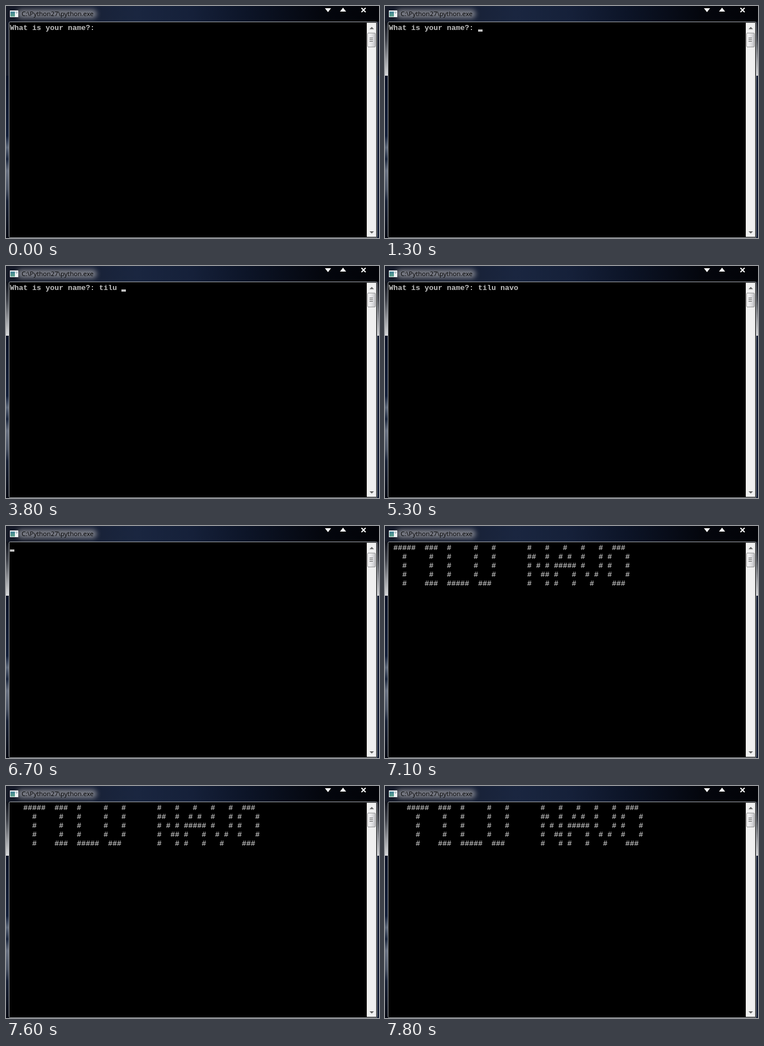
Animation, 669 px wide and 416 px high, one loop 8 s. Source, as an HTML page:

```html
<!DOCTYPE html>
<html lang="en">
<head>
<meta charset="utf-8">
<title>Console banner</title>
<style>
  html, body { margin: 0; width: 100%; height: 100%; overflow: hidden; background: #000; }
  svg { display: block; }
  .title { font: 11.5px "Open Sans", sans-serif; }
  .console { font: bold 13.333px "Liberation Mono", monospace; fill: #c0c0c0; }
</style>
</head>
<body>
<svg width="669" height="416" viewBox="0 0 669 416">
  <defs>
    <linearGradient id="bar">
      <stop offset="0" stop-color="#161a27"/>
      <stop offset=".35" stop-color="#1a2640"/>
      <stop offset=".5" stop-color="#152039"/>
      <stop offset=".65" stop-color="#0c1427"/>
      <stop offset=".85" stop-color="#04060d"/>
      <stop offset="1" stop-color="#020308"/>
    </linearGradient>
    <linearGradient id="side" x2="0" y2="1">
      <stop offset=".3" stop-color="#0b1226"/>
      <stop offset=".56" stop-color="#14203a"/>
      <stop offset=".61" stop-color="#5f6a7c"/>
      <stop offset=".66" stop-color="#1d283f"/>
      <stop offset=".71" stop-color="#6a7282"/>
      <stop offset=".79" stop-color="#4a5364"/>
      <stop offset=".84" stop-color="#1a2338"/>
      <stop offset="1" stop-color="#080b14"/>
    </linearGradient>
    <linearGradient id="bright" x2="0" y2="1">
      <stop offset="0" stop-color="#10131d"/>
      <stop offset=".35" stop-color="#454850"/>
      <stop offset=".7" stop-color="#9b9da2"/>
      <stop offset="1" stop-color="#d8d9db"/>
    </linearGradient>
    <linearGradient id="thumb">
      <stop offset="0" stop-color="#f7f7f7"/>
      <stop offset=".5" stop-color="#e3e3e5"/>
      <stop offset="1" stop-color="#c4c4c8"/>
    </linearGradient>
    <linearGradient id="pane" x2="0" y2="1">
      <stop offset="0" stop-color="#3d7f96"/>
      <stop offset="1" stop-color="#5fa489"/>
    </linearGradient>
    <filter id="blur" x="-20%" y="-80%" width="140%" height="260%"><feGaussianBlur stdDeviation="4"/></filter>
  </defs>

  <rect width="669" height="416" fill="#121c33"/>
  <rect width="6" height="416" fill="url(#side)"/>
  <rect id="backdrop" y="28" width="669" height="97"/>
  <rect width="669" height="28" fill="url(#bar)"/>
  <rect x="20" y="6" width="143" height="16" rx="8" fill="#8b8d94" opacity=".85" filter="url(#blur)"/>

  <rect x="7" y="8" width="15" height="12" fill="#f2f4f5"/>
  <rect x="8" y="10" width="8" height="9" fill="url(#pane)"/>
  <path d="M17 11h4M18 13h2" stroke="#7d9aa5"/>
  <text class="title" x="28" y="18">C:\Python27\python.exe</text>

  <path d="M572 4h11l-5.500 7zM599 10h11l-5.500-7z" fill="#fff"/>
  <path d="M637.500 3.500l7.500 7.500m0-7.500l-7.500 7.500" stroke="#fff" stroke-width="2"/>

  <rect x="5.500" y="28.500" width="660" height="387" rx="2" stroke="#a9adb2"/>

  <rect x="647" y="30" width="17" height="384" fill="#f0f0f0"/>
  <path d="M647.500 30v384" stroke="#e6e3e1"/>
  <path d="M652 41.500h8l-4-4zM652 404h8l-4 4z" fill="#606060"/>
  <rect x="648.500" y="48.500" width="14" height="25" rx="1.500" fill="url(#thumb)" stroke="#959595"/>
  <path d="M652 57.500h6M652 60.500h6M652 63.500h6" stroke="#555"/>
  <path d="M653 58.500h6M653 61.500h6M653 64.500h6" stroke="#fff" opacity=".6"/>

  <g id="lines" class="console"></g>
  <rect id="cursor" y="42" width="8" height="4" fill="#c0c0c0"/>
</svg>
<script>
const LOOP = 8000, CELL = 8, LINE = 16, LEFT = 7, BASELINE = 43;
const PROMPT = "What is your name?: ";
const NAME = "tilu navo";

const GLYPHS = {
  t: "#####|  #  |  #  |  #  |  #  ",
  i: " ### |  #  |  #  |  #  | ### ",
  l: "#    |#    |#    |#    |#####",
  u: "#   #|#   #|#   #|#   #| ### ",
  n: "#   #|##  #|# # #|#  ##|#   #",
  a: "  #  | # # |#####|#   #|#   #",
  v: "#   #|#   #|#   #| # # |  #  ",
  o: " ### |#   #|#   #|#   #| ### ",
  " ": "     |     |     |     |     "
};
const banner = [0, 1, 2, 3, 4].map(row =>
  [...NAME].map(ch => GLYPHS[ch].split("|")[row]).join(" "));

// [time, letters typed, cursor shown]
const TYPING = [
  [0, 0, 0], [1300, 0, 1], [1800, 0, 0], [2200, 1, 0], [2300, 1, 1], [2500, 2, 0],
  [2700, 3, 0], [2800, 3, 1], [3300, 3, 0], [3400, 4, 0], [3800, 5, 1], [4300, 5, 0],
  [4600, 6, 0], [4800, 6, 1], [4900, 7, 0], [5100, 8, 0], [5200, 8, 1], [5300, 9, 0],
  [5700, 9, 1]
];
const CLEARED = 6100;
const SHIFTS = [7100, 7300, 7600, 7800];

const byId = id => document.getElementById(id);
const backdrop = byId("backdrop"), cursor = byId("cursor");
const lines = banner.map((_, row) => {
  const line = document.createElementNS("http://www.w3.org/2000/svg", "text");
  line.setAttribute("x", LEFT);
  line.setAttribute("y", BASELINE + row * LINE);
  return byId("lines").appendChild(line);
});

function screenAt(t) {
  const shift = SHIFTS.filter(s => s <= t).length;
  if (shift) return { rows: banner.map(row => " ".repeat(shift) + row) };
  if (t >= CLEARED) return { rows: [], column: 0, blink: t < 6200 || t >= 6700 };
  const [, typed, blink] = TYPING.findLast(step => step[0] <= t);
  const text = PROMPT + NAME.slice(0, typed);
  return { rows: [text], column: text.length, blink };
}

function draw(now) {
  const t = now % LOOP;
  const { rows, column = 0, blink } = screenAt(t);
  lines.forEach((line, i) => {
    // SVG text collapses ordinary spaces
    const text = (rows[i] || "").replaceAll(" ", "\u00a0");
    if (line.textContent !== text) line.textContent = text;
  });
  cursor.setAttribute("x", LEFT + column * CELL);
  cursor.setAttribute("visibility", blink ? "visible" : "hidden");
  backdrop.setAttribute("fill", t < 900 ? "#151a2a" : "url(#bright)");
  requestAnimationFrame(draw);
}
requestAnimationFrame(draw);
</script>
</body>
</html>
```
